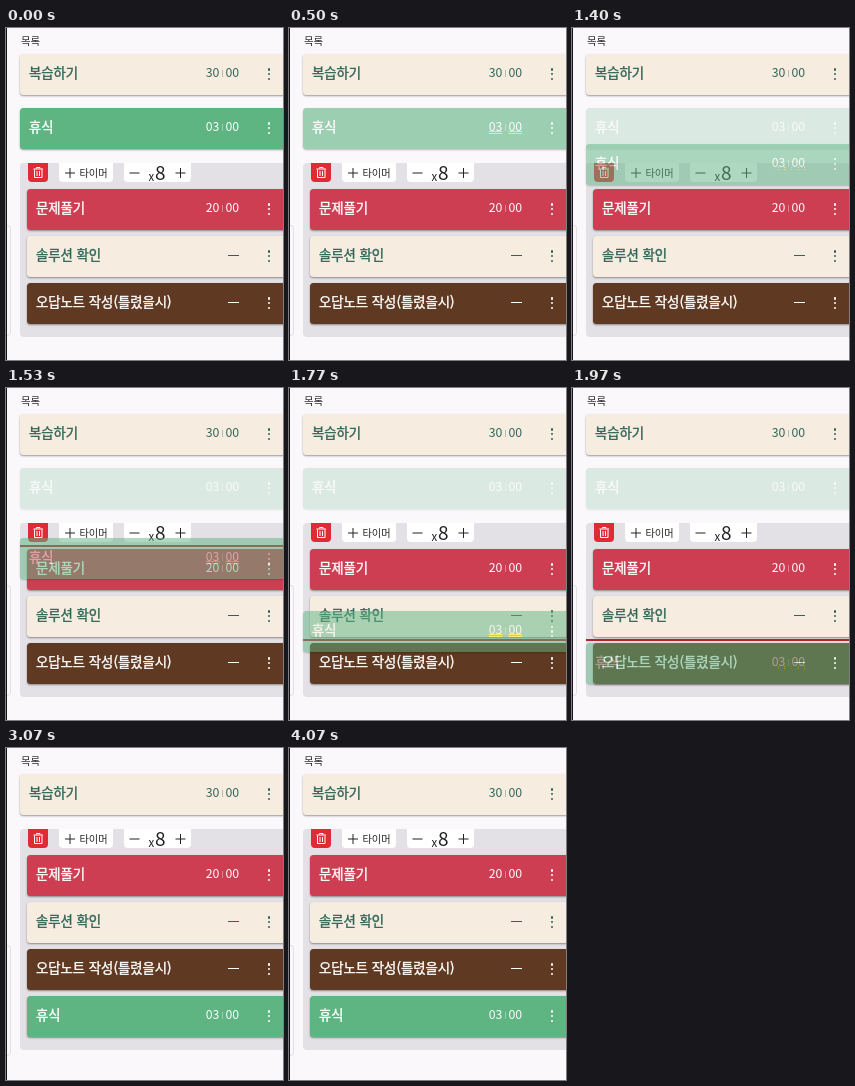
Animation, 277 px wide and 332 px high, one loop 4860 ms. Source, as an HTML page:

```html
<!DOCTYPE html>
<html lang="ko">
<head>
<meta charset="utf-8">
<style>
  html, body { margin: 0; width: 100%; height: 100%; overflow: hidden; }
  body { position: relative; background: #faf8fb; font-family: "Noto Sans CJK KR", "Noto Sans CJK", "Noto Sans CJK JP", sans-serif; }
  body *, svg { position: absolute; box-sizing: border-box; white-space: pre; }
  .edge { left: 0; top: 0; width: 1px; height: 332px; background: #17151a; }
  .panel { left: 1px; top: 197px; width: 4px; height: 111px; border: 1px solid #e3dfe6; border-left: 0; border-radius: 0 4px 4px 0; }
  .title { left: 15px; top: 3px; font-size: 10.4px; line-height: 20px; color: #242426; }
  .group { left: 14px; width: 270px; background: #e3e1e5; border-radius: 4px; }
  .tile { width: 275px; height: 41px; border-radius: 3.5px; box-shadow: 0 1px 2px #0006; }
  .name { left: 9px; top: 8px; font-size: 13.35px; line-height: 21px; -webkit-text-stroke: .4px currentColor; }
  .num { top: 8px; font-size: 12.3px; line-height: 21px; }
  .bar { top: 16px; width: 1px; height: 7px; background: currentColor; opacity: .35; }
  .dash { top: 19px; width: 11px; height: 1.2px; background: currentColor; }
  .dot { width: 2.2px; height: 2.2px; border-radius: 50%; background: currentColor; }
  .ghost { opacity: .5; }
  .ghost .num { text-decoration: underline double #fff000 .7px; text-underline-offset: 0; }
  .line { left: 14px; width: 263px; height: 2px; background: #b3242c; }
  .button { top: 0; height: 19.5px; border-radius: 0 0 4px 4px; background: #fff; color: #222; line-height: 19px; }
  svg { left: 0; top: 0; fill: none; stroke-width: 1; }
</style>
</head>
<body>
<script>
const LOOP = 4860, PICK = 370, DROP = 2800;
const LEFT = 14, PITCH = 47, ROW = 54;
const REST_TOP = 80, GROUP_TOP = 134.5;
const BEIGE = ['#f6ecdf', '#2f6557'], GREEN = ['#5fb582', '#fff'];
const RED = ['#cd3e52', '#fff'], BROWN = ['#5f3921', '#fff'];

// Drag path: time in ms, vertical offset in px
const PATH = [[1000, 0], [1130, 1], [1230, 4], [1380, 30], [1530, 70],
  [1650, 108], [1770, 143], [1900, 167], [2030, 181], [2230, 184]];

function add(parent, className, style = {}, text = '') {
  const el = document.createElement('div');
  el.className = className;
  el.textContent = text;
  Object.assign(el.style, style);
  parent.append(el);
  return el;
}

// x and y are relative to the parent; right-hand details keep fixed stage columns
function tile(parent, x, y, stageX, name, [background, color], minutes) {
  const el = add(parent, 'tile', { left: x + 'px', top: y + 'px', background, color });
  const at = column => ({ left: column - stageX + 'px' });
  add(el, 'name', {}, name);
  if (minutes) {
    add(el, 'num', at(199.8), minutes);
    add(el, 'bar', at(216));
    add(el, 'num', at(219.5), '00');
  } else {
    add(el, 'dash', at(222));
  }
  for (const top of [14.4, 19.2, 24]) add(el, 'dot', { ...at(261.7), top: top + 'px' });
  return el;
}

const outer = (y, ...rest) => tile(document.body, LEFT, y, LEFT, ...rest);

function button(x, width, icon, stroke = '#222') {
  const el = add(group, 'button', { left: x - LEFT + 'px', width: width + 'px' });
  el.innerHTML = `<svg width="${width}" height="20" stroke="${stroke}"><path d="${icon}"/></svg>`;
  return el;
}

add(document.body, 'edge');
add(document.body, 'panel');
add(document.body, 'title', {}, '목록');
outer(26, '복습하기', BEIGE, '30');
const rest = outer(REST_TOP, '휴식', GREEN, '03');

const group = add(document.body, 'group');
button(21.5, 20.5, 'M5.5 6h9.5M8.5 5.5V4.5h3.5v1M6.5 6.5v8h7.5V6.5M9 8v5M11.5 8v5', '#fff')
  .style.background = '#df2b36';
const timer = button(52.5, 54, 'M6 10h10M11 5v10');
add(timer, '', { left: '21px', top: '.5px', fontSize: '10.2px' }, '타이머');
const counter = button(117.5, 67, 'M5.5 10h10M51.5 10h10M56.5 5v10');
add(counter, '', { left: '25px', top: '4.5px', fontSize: '11.5px' }, 'x');
add(counter, '', { left: '31.5px', top: '-1px', fontSize: '19px' }, '8');

const inner = (i, ...rest) => tile(group, 7, 26.5 + i * PITCH, LEFT + 7, ...rest);
inner(0, '문제풀기', RED, '20');
inner(1, '솔루션 확인', BEIGE);
inner(2, '오답노트 작성(틀렸을시)', BROWN);
const dropped = inner(3, '휴식', GREEN, '03');

const line = add(document.body, 'line');
const ghost = outer(REST_TOP, '휴식', GREEN, '03');
ghost.classList.add('ghost');

function dragOffset(t) {
  const next = PATH.findIndex(([time]) => time > t);
  if (next === 0) return 0;
  if (next < 0) return PATH.at(-1)[1];
  const [t0, y0] = PATH[next - 1], [t1, y1] = PATH[next];
  return y0 + (y1 - y0) * (t - t0) / (t1 - t0);
}

const show = (el, visible) => { el.style.display = visible ? '' : 'none'; };

function render(t) {
  const done = t >= DROP, dragging = t >= PICK && !done;
  const offset = dragOffset(t), center = REST_TOP + 20.5 + offset;

  show(rest, !done);
  rest.style.opacity = dragging ? .2 : 1;
  group.style.top = GROUP_TOP - (done ? ROW : 0) + 'px';
  group.style.height = 174 + (done ? PITCH : 0) + 'px';
  show(dropped, done);

  show(ghost, dragging);
  ghost.style.top = REST_TOP + offset + 'px';

  // The marker snaps to the nearest gap between the inner tiles
  const gap = Math.max(0, Math.min(3, Math.round((center - 158) / PITCH)));
  show(line, dragging && center > 140);
  line.style.top = 156.5 + gap * PITCH + 'px';
}

function frame() {
  render(performance.now() % LOOP);
  requestAnimationFrame(frame);
}
frame();
</script>
</body>
</html>
```
